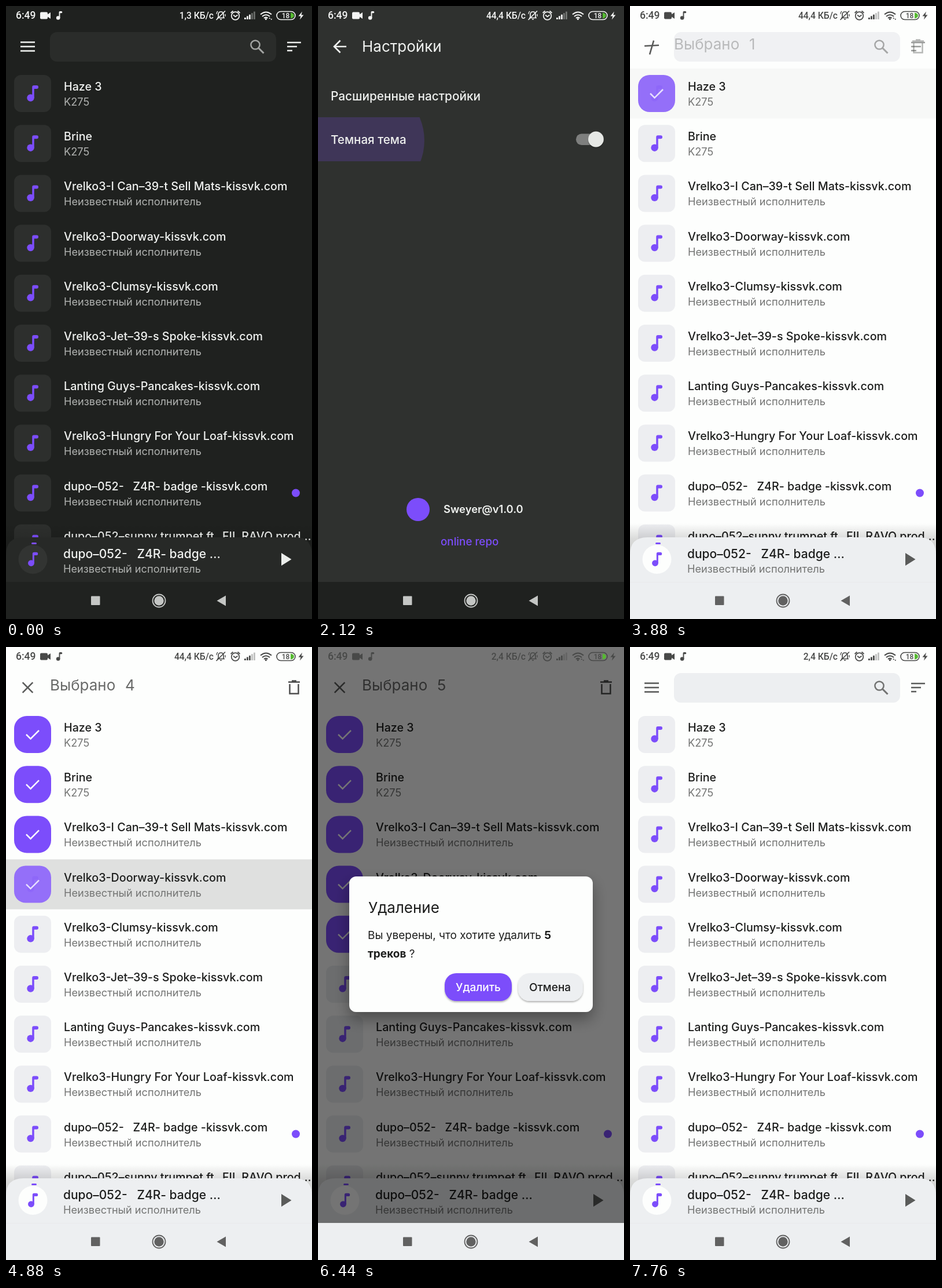
Write an HTML page that moves like this. It is 529x1058 px and loops after 8480 ms.

```html
<!DOCTYPE html>
<html lang="ru">
<head>
<meta charset="utf-8">
<title>Music player</title>
<style>
html, body { margin: 0; height: 100%; overflow: hidden; background: #1f211f; }
#stage { display: block; width: 100vw; height: 100vh; }
text { font-family: Inter, "Noto Sans", sans-serif; white-space: pre; }
.sys text { font-family: Roboto, "Noto Sans", sans-serif; font-weight: 500; }
.line { fill: none; stroke-linecap: butt; }
</style>
</head>
<body>
<svg id="stage" viewBox="0 0 529 1058" preserveAspectRatio="none"></svg>
<script>
const LOOP = 8480, W = 529, ROW = 86.2, PURPLE = '#7c4dfb';
const UNKNOWN = 'Неизвестный исполнитель';
const tracks = [
  ['Haze 3', 'K275'],
  ['Brine', 'K275'],
  ['Vrelko3-I Can–39-t Sell Mats-kissvk.com'],
  ['Vrelko3-Doorway-kissvk.com'],
  ['Vrelko3-Clumsy-kissvk.com'],
  ['Vrelko3-Jet–39-s Spoke-kissvk.com'],
  ['Lanting Guys-Pancakes-kissvk.com'],
  ['Vrelko3-Hungry For Your Loaf-kissvk.com'],
  ['dupo–052-   Z4R- badge -kissvk.com'],
  ['dupo–052–sunny trumpet ft_ FIL RAVO prod…']
];
// Press, full ripple, fade end and selection start for each tapped row
const taps = [
  [3360, 3560, 3760, 3910, 3760],
  [3920, 4160, 4160, 4360, 4040],
  [4160, 4400, 4400, 4600, 4280],
  [4640, 4880, 4880, 5080, 4760],
  [5040, 5280, 5280, 5480, 5160]
];

const span = (t, a, b) => Math.min(1, Math.max(0, (t - a) / (b - a)));
const out = x => 1 - (1 - x) ** 3;
const rgb = hex => [1, 3, 5].map(i => parseInt(hex.slice(i, i + 2), 16));
const hex = v => Math.round(v).toString(16).padStart(2, '0');
const mix = (a, b, k) => {
  const p = rgb(a), q = rgb(b);
  return '#' + p.map((v, i) => hex(v + (q[i] - v) * k)).join('');
};

const rect = (x, y, w, h, fill, r = 0, more = '') =>
  `<rect x="${x}" y="${y}" width="${w}" height="${h}" rx="${r}" fill="${fill}" ${more}/>`;
const circle = (x, y, r, fill, more = '') =>
  `<circle cx="${x}" cy="${y}" r="${r}" fill="${fill}" ${more}/>`;
const shape = (d, fill, more = '') => `<path d="${d}" fill="${fill}" ${more}/>`;
const line = (d, color, w = 2.6, more = '') =>
  `<path class="line" d="${d}" stroke="${color}" stroke-width="${w}" ${more}/>`;
const text = (x, y, size, fill, str, weight = 400, more = '') =>
  `<text x="${x}" y="${y}" font-size="${size}" fill="${fill}" font-weight="${weight}" ${more}>${str}</text>`;
const fade = (k, body) => k > 0 ? `<g opacity="${k}">${body}</g>` : '';

const note = (x, y, s, color, alpha = 1) =>
  `<g transform="translate(${x} ${y}) scale(${s})" fill="${color}" opacity="${alpha}">` +
  '<circle cx="-3.5" cy="7.5" r="6.2"/><path d="M-.8 8V-11q0-3 3-3H7q3 0 3 3T7-8H2.7V8z"/></g>';

const ripple = (x, y, top, h, r, fill, alpha) => alpha > 0 && r > 0
  ? `<svg y="${top}" width="${W}" height="${h}">${circle(x, y - top, r, fill, `opacity="${alpha}"`)}</svg>` : '';

function palette(k) {
  const c = (dark, light) => mix(dark, light, k);
  return {
    bg: c('#1f211f', '#fdfefd'), page: c('#2f312f', '#fdfefd'),
    tile: c('#2d2f2d', '#edeef1'), field: c('#2a2c2a', '#edeff1'),
    panel: c('#272927', '#edeff1'), nav: c('#202220', '#edeff1'),
    pageNav: c('#1f211f', '#fdfefd'), disc: c('#323432', '#fdfefd'),
    title: c('#f0f2f0', '#1c1d1c'), sub: c('#b0b2b0', '#747574'),
    item: c('#eff1ef', '#616161'), icon: c('#eceeec', '#5a5b5a'),
    search: c('#a3a5a3', '#717271'), status: c('#f4f5f4', '#484948'),
    keys: c('#c4c6c4', '#616161'), rule: c('#1f211f', '#e8e9ea')
  };
}

// 0 = plain row, 1 = selected
const picked = (t, i) => taps[i]
  ? out(span(t, taps[i][4], taps[i][4] + 300)) * (1 - out(span(t, 7460, 7760))) : 0;

function row(t, i, p) {
  const [name, artist = UNKNOWN] = tracks[i], y = 108 + i * ROW, e = picked(t, i);
  let s = '';
  if (taps[i]) {
    const [a, b, c, d] = taps[i];
    s += ripple(265, y + 43, y, ROW, t < a ? 0 : 60 + 225 * out(span(t, a, b)), '#000', .12 * (1 - span(t, c, d)));
  }
  s += rect(14, y + 11, 64, 64, mix(p.tile, PURPLE, e), 12 + 10 * e);
  s += note(46, y + 43, 1, PURPLE, 1 - e);
  s += fade(e, line(`M35 ${y + 43}l7.5 7.5 14.5-14.5`, '#fff', 2.5));
  s += text(100, y + 38, 19.7, p.title, name, 500);
  return s + text(100, y + 64, 18.2, p.sub, artist);
}

function header(t, p) {
  const h = span(t, 3760, 4060) * (1 - span(t, 7460, 7760));
  const e = out(span(t, 3760, 4060)) * (1 - out(span(t, 7460, 7760)));
  const count = Math.max(1, taps.filter(a => t >= a[4]).length);
  const bar = (dy, turn, k) => line('M-12.5 0h25', p.icon, 2.6,
    `transform="translate(37.5 ${70 + dy}) rotate(${turn})" opacity="${k}"`);
  return bar(-7.5 * (1 - e), 225 * e, 1) + bar(0, 0, Math.max(0, 1 - 2 * e)) + bar(7.5 * (1 - e), 135 * e, 1) +
    fade(1 - h * h, rect(76, 45, 391, 51, p.field, 12)) +
    fade(1 - h, circle(431, 67, 7.6, 'none', `stroke="${p.search}" stroke-width="2.5"`) +
      line('M436.5 72.5l9 9', p.search, 3) +
      line('M486 63h24M486 70h17M486 77h9', p.icon, 2.5)) +
    fade(h, text(76, 75, 26, '#686968', 'Выбрано') + text(206, 75, 26, '#686968', count) +
      line('M490.5 64v16.5h15V64M488 60.5h20M494 58.5h8', '#4d4e4d', 2.5));
}

function player(p, dark) {
  return `<rect y="893" width="${W}" height="60" fill="url(#shade)" opacity="${1 - dark * .3}"/>` +
    shape('M0 994V947Q0 917 30 917H499Q529 917 529 947V994z', p.panel) +
    rect(44, 926, 9, 3, PURPLE, 1.5) + circle(46.5, 955, 25, p.disc) + note(46.5, 955, .87, PURPLE) +
    text(99, 953, 21, p.title, 'dupo–052-   Z4R- badge …', 500) +
    text(99, 978, 18.2, p.sub, UNKNOWN) + shape('M476 944l17.5 11-17.5 11z', p.icon);
}

function list(t, p, dark) {
  return rect(0, 0, W, 994, p.bg) + header(t, p) +
    tracks.map((_, i) => row(t, i, p)).join('') +
    circle(501, 840.5, 7, PURPLE) + player(p, dark);
}

function drawer(t, p) {
  const d = out(span(t, 400, 720));
  if (!d || t >= 1280) return '';
  return rect(0, 0, W, 994, '#000', 0, `opacity="${.54 * d}"`) +
    `<g transform="translate(${409 * (d - 1)} 0)">` + rect(0, 0, 409, 994, p.bg) +
    text(22, 163, 20.7, p.item, 'Настройки', 500) + '</g>';
}

function settings(t, p, k) {
  const r = t < 2120 ? 0 : 99 + 381 * span(t, 2120, 2320);
  const knob = 480.5 - 25.5 * out(span(t, 2160, 2340));
  return rect(0, 0, W, 994, p.page) +
    line('M49 70H28.5M38.5 59.5L28 70l10.5 10.5', p.title, 2.7) +
    text(76, 79, 26, p.title, 'Настройки') +
    text(22, 163, 20.8, p.item, 'Расширенные настройки', 500) +
    ripple(83, 232, 192, 76, r, PURPLE, .2 * (1 - span(t, 2360, 2600))) +
    text(22, 238, 20.6, p.item, 'Темная тема', 500) +
    rect(446, 220.5, 44.5, 19.5, mix('#ffffff', '#000000', k), 9.7, 'opacity=".38"') +
    circle(knob, 231.5, 14, '#000', 'opacity=".18"') +
    circle(knob, 230, 13.4, mix('#e6e8e5', '#fafbfa', k)) +
    circle(173, 869, 20, PURPLE) +
    text(217, 875, 18.4, p.item, 'Sweyer@v1.0.0', 600) +
    text(212, 931, 18.8, PURPLE, 'online repo', 500);
}

function dialog(t) {
  const o = out(span(t, 5540, 5860)) * (1 - span(t, 6980, 7200));
  if (!o) return '';
  const scale = .9 + .1 * out(span(t, 5540, 5860));
  const press = .12 * span(t, 6800, 6960);
  return fade(o, rect(0, 0, W, 994, '#000', 0, 'opacity=".54"') +
    `<g transform="translate(264.5 513) scale(${scale}) translate(-264.5 -513)">` +
    rect(54, 396, 421, 234, '#fdfefd', 12, 'filter="url(#deep)"') +
    text(87, 459, 26, '#1c1d1c', 'Удаление') +
    text(86, 504, 19, '#1c1d1c', 'Вы уверены, что хотите удалить <tspan font-weight="700">5</tspan>') +
    text(86, 536, 19, '#1c1d1c', '<tspan font-weight="700">треков</tspan> ?') +
    rect(219, 563, 116, 48, PURPLE, 20, 'filter="url(#soft)"') +
    rect(346, 563, 112, 48, '#edeff1', 20, 'filter="url(#soft)"') +
    rect(346, 563, 112, 48, '#000', 20, `opacity="${press}"`) +
    text(277, 594, 19, '#fff', 'Удалить', 500, 'text-anchor="middle"') +
    text(401, 594, 19, '#1c1d1c', 'Отмена', 500, 'text-anchor="middle"') + '</g>');
}

function statusBar(t, c) {
  const speed = t < 1000 ? '1,3' : t < 5120 ? '44,4' : '2,4';
  const traffic = t < 1600 || (t >= 2860 && t < 4640) || t >= 5120;
  const bars = [0, 1, 2, 3, 4].map(i =>
    rect(412 + i * 4, 20 - i * 2.6, 2.8, 3 + i * 2.6, c, 0, `opacity="${i < 3 ? 1 : .35}"`)).join('');
  return '<g class="sys">' + text(17, 22, 17.5, c, '6:49') +
    rect(59, 10.5, 13, 12, c, 2) + shape('M71 15l6-4v11l-6-4z', c) + note(92, 16.5, .53, c) +
    text(359, 22, 15.6, c, speed + ' КБ/с', 500, 'text-anchor="end"') +
    line('M365 20.5h13M367 20v-5q0-5 4.5-5t4.5 5v5M370 23h3M379 8.5L363.5 24', c, 1.7) +
    line('M364 14q0-3 2-5M379 14v4', c, 1.3) +
    circle(396.5, 17, 6.8, 'none', `stroke="${c}" stroke-width="1.7"`) +
    line('M393 15.5l3.5 3 4-3M388.5 12l4-3.5M404.5 12l-4-3.5', c, 1.7) + bars +
    line('M440 14.5q9.5-8 19 0M443 18q6.5-5.5 13 0M446 21q3.2-2.6 6.5 0', c, 2.1) + circle(449.3, 22.6, 1.6, c) +
    (traffic ? shape('M454.5 22l1.3-2.5 1.3 2.5zM457.5 22l1.3 2.5 1.3-2.5z', c) : '') +
    rect(468, 9.5, 32, 14, 'none', 7, `stroke="${c}" stroke-width="1.6"`) +
    shape('M492 11.5q6 1 6 5t-6 5z', '#56b932') +
    text(483.5, 21, 12, c, '18', 500, 'text-anchor="middle"') +
    shape('M512 9.5l-6.5 8h4l-1.5 6 6.5-8h-4z', c) + '</g>';
}

function navBar(p, s) {
  return rect(0, 994, W, 64, mix(p.nav, p.pageNav, s)) + rect(0, 994, W, 1, p.rule) +
    rect(147, 1018.5, 15.5, 15.5, p.keys, 1) +
    circle(264.5, 1026.5, 11, 'none', `stroke="${p.keys}" stroke-width="1.8"`) +
    circle(264.5, 1026.5, 8.2, p.keys) + shape('M380 1017.5v18l-15.5-9z', p.keys);
}

const defs = `<defs>
  <linearGradient id="shade" x1="0" y1="0" x2="0" y2="1">
    <stop offset="0" stop-opacity="0"/><stop offset=".45" stop-opacity=".14"/><stop offset="1" stop-opacity=".2"/>
  </linearGradient>
  <filter id="deep" x="-20%" y="-20%" width="140%" height="150%">
    <feDropShadow dx="0" dy="12" stdDeviation="13" flood-opacity=".35"/></filter>
  <filter id="soft" x="-20%" y="-20%" width="140%" height="160%">
    <feDropShadow dx="0" dy="2" stdDeviation="1.5" flood-opacity=".3"/></filter>
</defs>`;

function scene(t) {
  const k = span(t, 2160, 2360), p = palette(k);
  const s = span(t, 920, 1260) * (1 - span(t, 2740, 2980));
  return defs + (s < 1 ? list(t, p, 1 - k) + drawer(t, p) : '') +
    fade(s, settings(t, p, k)) + dialog(t) + statusBar(t, p.status) + navBar(p, s);
}

const stage = document.getElementById('stage'), start = performance.now();
function frame() {
  stage.innerHTML = scene((performance.now() - start) % LOOP);
  requestAnimationFrame(frame);
}
frame();
</script>
</body>
</html>
```
